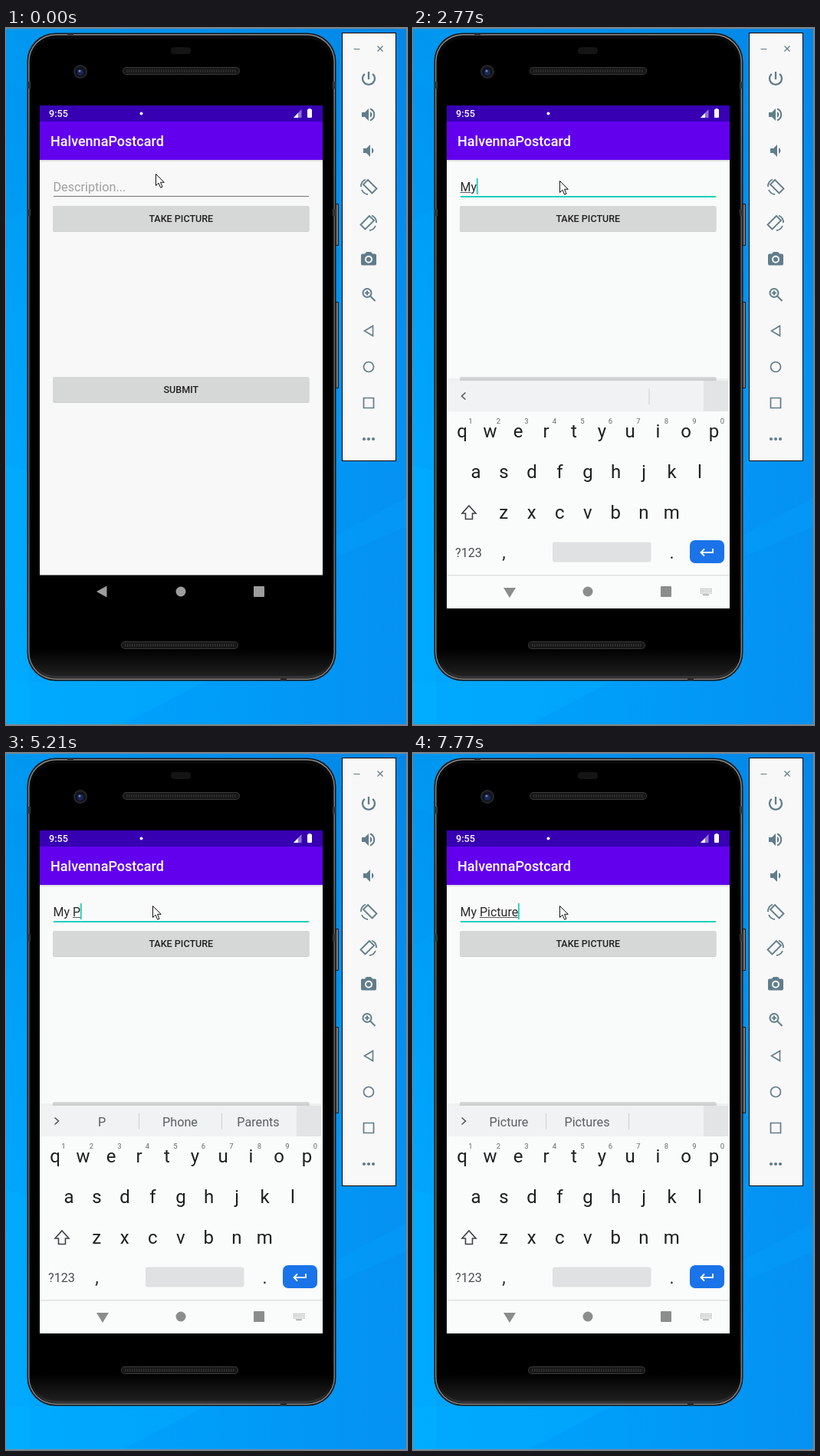
An HTML page with a canvas that plays this animation: 523 px wide and 909 px high, repeating every 8000 ms.

```html
<!DOCTYPE html>
<html lang="en">
<head>
<meta charset="utf-8">
<title>Phone typing demo</title>
<style>
html, body { margin: 0; width: 100%; height: 100%; overflow: hidden; background: #0095f5; }
canvas { display: block; width: 523px; height: 909px; }
</style>
</head>
<body>
<canvas id="stage"></canvas>
<script>
const W = 523, H = 909, LOOP = 8000;
const TEAL = '#1ccfbd', SLATE = '#607d8b';
const canvas = document.getElementById('stage');
const dpr = window.devicePixelRatio || 1;
canvas.width = W * dpr;
canvas.height = H * dpr;
const c = canvas.getContext('2d');

// Each entry changes part of the state at the given time.
const steps = [
  [0, { text: '', marked: 0, caret: false, focus: false, nav: 'back', keys: false, upper: false, mouse: [195, 190], words: [] }],
  [400, { focus: true }],
  [560, { caret: true, mouse: [194, 193] }],
  [700, { mouse: [191, 199] }],
  [970, { caret: false }],
  [1250, { nav: 'down' }],
  [1540, { caret: true }],
  [2340, { caret: false, nav: 'dim' }],
  [2470, { caret: true, nav: 'none' }],
  [2770, { text: 'My', marked: 1, keys: true }],
  [3060, { marked: 2 }],
  [3210, { words: ['My', 'Mystery', 'Me'] }],
  [3610, { text: 'My ' }],
  [3860, { marked: 0 }],
  [3990, { words: ['hero', 'dog', 'cat'] }],
  [4410, { caret: false }],
  [4940, { caret: true }],
  [5070, { upper: true }],
  [5210, { text: 'My P', marked: 4, upper: false, words: ['P', 'Phone', 'Parents'] }],
  [5770, { caret: false }],
  [5890, { text: 'My Pi', caret: true }],
  [6170, { marked: 5, words: ['Pi', 'Pic', 'Pink'] }],
  [6450, { text: 'My Pict', marked: 6, words: ['Pic', 'Pics', 'Pink'] }],
  [6720, { marked: 7 }],
  [6870, { text: 'My Pictu', words: ['Pict', 'Picture', 'Pictures'] }],
  [7120, { marked: 8, words: ['Pictu', 'Picture', 'Pictures'] }],
  [7240, { text: 'My Pictur' }],
  [7380, { marked: 9, words: ['Pictur', 'Picture', 'Pictures'] }],
  [7510, { text: 'My Picture' }],
  [7630, { marked: 10 }],
  [7770, { words: ['Picture', 'Pictures', ''] }]
];

function stateAt(t) {
  const s = {};
  for (const [start, change] of steps) if (start <= t) Object.assign(s, change);
  return s;
}

function rect(x, y, w, h, fill, r = 0) {
  c.fillStyle = fill;
  c.beginPath();
  c.roundRect(x, y, w, h, r);
  c.fill();
}

function dot(x, y, r, fill) {
  c.fillStyle = fill;
  c.beginPath();
  c.arc(x, y, r, 0, 7);
  c.fill();
}

function poly(pts, fill) {
  c.fillStyle = fill;
  c.beginPath();
  pts.forEach(([x, y]) => c.lineTo(x, y));
  c.fill();
}

function grad(x0, y0, x1, y1, ...colors) {
  const g = c.createLinearGradient(x0, y0, x1, y1);
  colors.forEach((col, i) => g.addColorStop(i / (colors.length - 1), col));
  return g;
}

function label(str, x, y, size, fill, align = 'center', weight = 400) {
  c.font = `${weight} ${size}px Roboto, sans-serif`;
  c.textAlign = align;
  c.fillStyle = fill;
  c.fillText(str, x, y);
}

function icon(x, y, { fill, line, color = SLATE, width = 2 }) {
  c.save();
  c.translate(x, y);
  c.fillStyle = c.strokeStyle = color;
  c.lineWidth = width;
  if (fill) c.fill(new Path2D(fill), 'evenodd');
  if (line) c.stroke(new Path2D(line));
  c.restore();
}

function desktop() {
  rect(0, 0, W, H, grad(0, 0, W, 0, '#00a6fc', '#009df9', '#0591f1'));
  rect(0, 0, W, 560, grad(0, 0, 0, 560, 'rgba(0,90,190,.2)', 'rgba(0,110,220,0)'));
  poly([[0, 70], [30, 82], [30, 235], [0, 250]], 'rgba(0,120,225,.08)');
  poly([[0, 570], [30, 578], [30, 909], [0, 909]], 'rgba(0,180,255,.3)');
  poly([[430, 662], [W, 612], [W, 650], [430, 690]], 'rgba(0,165,255,.25)');
  poly([[0, 852], [260, 852], [150, H], [0, H]], 'rgba(0,178,255,.3)');
  rect(0, 0, W, 1, '#7b8791');
  rect(W - 1, 0, 1, H, '#7b8791');
  rect(0, H - 1, W, 1, '#7b8791');
}

function grille(x, y) {
  rect(x, y, 153, 10, '#3b3b3b', 5);
  rect(x + 1, y + 1, 151, 8, '#171717', 4);
  for (let i = 5; i < 149; i += 3) rect(x + i, y + 3, 1.5, 4, '#303030');
}

function sideKey(y, h) {
  rect(428, y, 6, h, '#1c1c1c', 1);
  rect(430, y + 1, 3, h - 2, grad(430, 0, 433, 0, '#4a4a4a', '#8d8d8d'), 1);
}

function phone() {
  sideKey(229, 55);
  sideKey(357, 113);
  rect(27.5, 6.5, 403, 845, '#161616', 37);
  rect(29, 8, 400, 842, grad(0, 8, 0, 850, '#8a8a8a', '#666', '#666', '#666', '#858585'), 36);
  rect(30.5, 9.5, 397, 839, '#0a0a0a', 34.5);
  rect(31, 796, 396, 52, grad(0, 808, 0, 848, '#000', '#141414', '#363636'), [0, 0, 34, 34]);
  rect(33, 14, 392, 829, '#000', 32);
  rect(33, 810, 392, 35, grad(0, 810, 0, 845, '#000', '#202020'), [0, 0, 32, 32]);
  for (const x of [28, 426]) {
    rect(x, 70, 4, 9, '#343434');
    rect(x, 236, 4, 9, '#343434');
  }
  rect(80, 7, 8, 2, '#292929');
  rect(358, 848, 8, 3, '#292929');
  rect(215, 25, 26, 9, '#141414', 4);
  dot(97, 57, 9, '#26272b');
  dot(97, 57, 7, '#11131d');
  dot(97, 58, 4, '#182754');
  dot(96, 56, 1.5, '#7185c8');
  grille(152, 51);
  grille(150, 800);
}

function toolbar() {
  rect(438, 6, 71, 559, '#000');
  rect(439, 7, 69, 557, '#f8f8f8');
  icon(457.5, 27, { line: 'M-4 .5H4', width: 1 });
  icon(488, 27, { line: 'M-3.5-3.5L3.5 3.5M-3.5 3.5L3.5-3.5', width: 1.3 });
  const tilt = 'M-1-9L10.5 2.5L4.5 8.5L-7-3ZM-10 0A10 10 0 0 1-4-9.5M-9 4A10 10 0 0 0-1 10';
  const tiltBack = 'M1-9L-10.5 2.5L-4.5 8.5L7-3ZM10 0A10 10 0 0 0 4-9.5M9 4A10 10 0 0 1 1 10';
  const tools = [
    { line: 'M0-9V1M5.2-6.2A8 8 0 1 1-5.2-6.2', width: 2.3 },
    { fill: 'M-9-3V3H-5L0 8V-8L-5-3ZM2-4A4.5 4.5 0 0 1 2 4Z', line: 'M2-7.5A8 8 0 0 1 2 7.5' },
    { fill: 'M-7-3V3H-3L2 8V-8L-3-3ZM4-4A4.5 4.5 0 0 1 4 4Z' },
    { line: tilt, width: 1.8 },
    { line: tiltBack, width: 1.8 },
    { fill: 'M-10-4.5Q-10-6.5-8-6.5H-5L-3-9H3L5-6.5H8Q10-6.5 10-4.5V6.5Q10 8.5 8 8.5H-8Q-10 8.5-10 6.5ZM5 .8A5 5 0 1 0-5 .8A5 5 0 1 0 5 .8ZM3 .8A3 3 0 1 1-3 .8A3 3 0 1 1 3 .8Z' },
    { line: 'M3.5-2.5A5.5 5.5 0 1 1-7.5-2.5A5.5 5.5 0 1 1 3.5-2.5M2 1.5L8.5 8M-2-5.5V.5M-5-2.5H1' },
    { line: 'M5.5-6.5V6.5L-5.5 0Z', width: 1.6 },
    { line: 'M6.5 0A6.5 6.5 0 1 1-6.5 0A6.5 6.5 0 1 1 6.5 0', width: 1.7 },
    { line: 'M-6.5-6.5H6.5V6.5H-6.5Z', width: 1.7 }
  ];
  tools.forEach((tool, i) => icon(473, 66 + 47 * i, tool));
  for (const x of [467, 473, 479]) dot(x, 536, 2.1, SLATE);
}

function appBars() {
  rect(44, 101, 369, 21, '#3700b3');
  rect(44, 122, 369, 50, '#6200ee');
  rect(44, 172, 369, 3, grad(0, 172, 0, 175, '#d4d4d6', '#f8f8f8'));
  label('9:55', 56, 116, 12.6, '#fff', 'left', 500);
  dot(176.5, 111.5, 2, '#fff');
  poly([[375, 117], [385.5, 106], [385.5, 117]], '#8f72d5');
  poly([[375, 117], [381, 111], [381, 117]], '#fff');
  rect(393, 106, 6, 11, '#fff', 1);
  rect(394.5, 105, 3, 2, '#fff');
  label('HalvennaPostcard', 58, 154, 18, '#fff', 'left', 500);
}

function button(str, y) {
  rect(61, y + 1, 334.5, 33, '#d0d1d1', 2);
  rect(61, y, 334.5, 33, '#d6d8d7', 2);
  label(str, 228.3, y + 21, 12.57, '#202020', 'center', 500);
}

function field(s) {
  if (s.focus) rect(62, 219, 333, 2, TEAL);
  else rect(62, 219, 333, 1, '#727272');
  if (s.text) label(s.text, 61.5, 213, 16, '#292929', 'left');
  else label('Description...', 61.5, 213, 16.2, '#a0a0a0', 'left');
  const widthTo = n => c.measureText(s.text.slice(0, n)).width;
  if (s.marked) {
    const from = s.marked > 2 ? widthTo(3) : 0;
    rect(61.5 + from, 214, widthTo(s.marked) - from, 1, '#5a5a5a');
  }
  if (s.caret) rect(61.3 + widthTo(s.text.length), 196, 1.8, 21, TEAL);
}

function nav(kind) {
  if (kind === 'none') return;
  const gray = kind === 'kb' ? '#8b8d8d' : '#9d9d9d';
  c.globalAlpha = kind === 'dim' ? 0.5 : 1;
  if (kind === 'back') poly([[118, 735], [131.5, 727.5], [131.5, 742.5]], gray);
  else {
    poly([[118, 730], [134, 730], [126, 743]], gray);
    for (let row = 0; row < 3; row++)
      for (let x = 375; x < 389; x += 2.6) rect(x, 731 + row * 2.6, 1.3, 1.3, gray);
    rect(378, 738.6, 8, 1.2, gray);
  }
  dot(228, 735, 6.5, gray);
  rect(323, 728, 14, 14, gray, 1);
  c.globalAlpha = 1;
}

function keyboard(s) {
  rect(44, 457, 369, 3, 'rgba(0,0,0,.04)');
  rect(44, 460, 369, 297, '#fafcfb');
  rect(44, 460, 367, 40, '#f0f2f3');
  rect(379, 460, 32, 40, '#e2e4e5');
  const open = s.words.length > 0;
  icon(66, 480, { line: open ? 'M-2.5-4.5L2.5 0L-2.5 4.5' : 'M2.5-4.5L-2.5 0L2.5 4.5', color: '#55595c', width: 1.6 });
  for (const x of open ? [173, 281] : [307.5]) rect(x, 470, 1, 21, '#cdd0d1');
  s.words.forEach((word, i) => label(word, [125, 227, 329][i], 486.5, 16.2, '#5b5f62'));

  const rows = [['qwertyuiop', 64], ['asdfghjkl', 82], ['zxcvbnm', 118.3]];
  rows.forEach(([letters, x0], row) => {
    [...letters].forEach((ch, i) => {
      label(s.upper ? ch.toUpperCase() : ch, x0 + i * 36.5, 534 + row * 53, 24, '#1d1f20');
    });
  });
  for (let i = 0; i < 10; i++) label((i + 1) % 10, 75 + i * 36.5, 516, 9.5, '#64686a');
  const shift = 'M0-9L9 1H4.5V8.5H-4.5V1H-9Z';
  icon(73, 632, { line: shift, fill: s.upper ? shift : '', color: '#3d4144', width: 1.6 });

  label('?123', 72.5, 689.5, 16.2, '#4a4e51');
  label(',', 118.5, 692, 23, '#292c2e');
  label('.', 337.5, 692, 23, '#292c2e');
  rect(182, 670.5, 128.5, 26, '#e0e1e2', 3);
  rect(361, 668, 45, 30, '#1a73e8', 7);
  icon(383, 684, { line: 'M8-5V0H-7M-3-4.5L-7.5 0L-3 4.5', color: '#fff', width: 1.8 });
  rect(44, 713, 369, 1.5, '#dfe1e1');
  nav('kb');
}

function pointer([x, y]) {
  const arrow = new Path2D('M.5.5V15.5L4 12.2L6.6 18.2L9 17.2L6.5 11.3H11.3Z');
  c.save();
  c.translate(x, y);
  c.fillStyle = '#fff';
  c.strokeStyle = '#111';
  c.lineWidth = 1;
  c.fill(arrow);
  c.stroke(arrow);
  c.restore();
}

function draw(now) {
  const s = stateAt(now % LOOP);
  c.setTransform(dpr, 0, 0, dpr, 0, 0);
  desktop();
  phone();
  toolbar();
  rect(44, 101, 369, 612.5, s.keys ? '#f9fbfa' : '#f8f8f8');
  appBars();
  field(s);
  button('TAKE PICTURE', 232);
  button('SUBMIT', 455);
  if (s.keys) keyboard(s);
  else nav(s.nav);
  pointer(s.mouse);
}

const began = performance.now();
function tick() {
  draw(performance.now() - began);
  requestAnimationFrame(tick);
}
tick();
</script>
</body>
</html>
```
